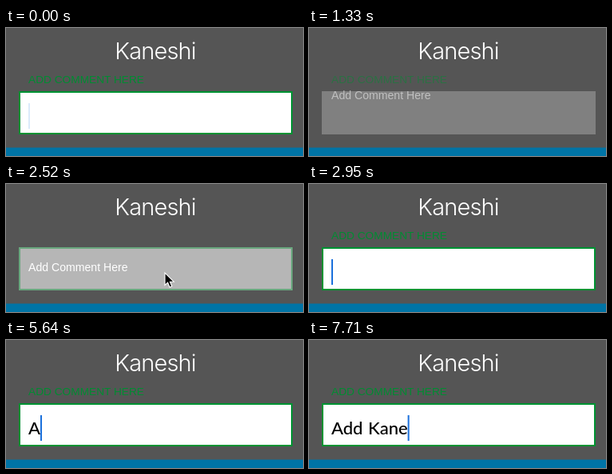
Write an HTML page that moves like this. It is 372 px wide and 160 px high and loops after 8 s.

```html
<!DOCTYPE html>
<html lang="en">
<head>
<meta charset="utf-8">
<title>Floating label field</title>
<style>
  html, body { margin: 0; width: 100%; height: 100%; overflow: hidden; background: #555; }
  svg { display: block; width: 372px; height: 160px; }
  text { white-space: pre; }
  .title { font: 300 29px Inter, sans-serif; letter-spacing: -.03em; fill: #fff; }
  .label { font: 13.7px "Liberation Sans", Arial, sans-serif; fill: #008c32; }
  .hint { font: 14.1px "Liberation Sans", Arial, sans-serif; fill: #fff; }
  .typed { font: 500 22px Lato, sans-serif; word-spacing: 1px; fill: #000; }
</style>
</head>
<body>
<svg viewBox="0 0 372 160">
  <rect width="372" height="160" fill="#555"/>
  <rect y="149.5" width="372" height="11" fill="#0074a6"/>
  <text class="title" x="187" y="39" text-anchor="middle">Kaneshi</text>
  <rect id="field" x="16" y="79" width="343" height="54"/>
  <rect id="border" x="17" y="80" width="341" height="52" fill="none" stroke="#009232" stroke-width="2"/>
  <text id="label" class="label" x="28" y="69">ADD COMMENT HERE</text>
  <text id="hint" class="hint" x="28">Add Comment Here</text>
  <text id="typed" class="typed" x="28" y="118"></text>
  <rect id="caret" y="94" width="2" height="32" fill="#1a70dc"/>
  <path id="cursor" d="M0 0V15.5L3.6 12.2L6 18L8.8 16.8L6.4 11.2H11.2Z" fill="#000" stroke="#fff" stroke-width="1.1"/>
</svg>
<script>
const LOOP = 8000;
const MESSAGE = "Add Kane";
const [field, border, label, hint, typed, caret, cursor] =
  ["field", "border", "label", "hint", "typed", "caret", "cursor"].map(id => document.getElementById(id));

// Time of each key press
const keyTimes = [5640, 5790, 5940, 6390, 6830, 7120, 7410, 7710];

// [start time, caret opacity]
const caretSteps = [
  [0, .15], [150, 1], [450, 0], [900, .15], [1050, 1], [1170, 0],
  [2600, 1], [3250, 0], [3550, .15], [3690, 1], [3990, 0], [4140, .15],
  [4290, 1], [4590, 0], [5040, .15], [5190, 1]
];

const progress = (t, start, end) => Math.min(1, Math.max(0, (t - start) / (end - start)));
const smooth = p => p * p * (3 - 2 * p);
const mix = (a, b, p) => a + (b - a) * p;
const stepAt = (steps, t) => steps.findLast(([start]) => start <= t)[1];

function render(t) {
  const focus = 1 - progress(t, 1130, 1300) + progress(t, 2450, 2617);
  const raised = 1 - smooth(progress(t, 1130, 1530)) + smooth(progress(t, 2550, 2940));

  const shade = mix(128, 255, focus);
  field.setAttribute("fill", `rgb(${shade},${shade},${shade})`);
  border.setAttribute("opacity", focus);
  label.setAttribute("opacity", raised);
  hint.setAttribute("y", mix(109, 69, raised));
  hint.setAttribute("opacity", 1 - raised);

  typed.textContent = MESSAGE.slice(0, keyTimes.filter(time => time <= t).length);
  const width = typed.textContent ? typed.getComputedTextLength() : 0;
  caret.setAttribute("x", 28 + width);
  caret.setAttribute("opacity", stepAt(caretSteps, t));

  const arrival = 1 - (1 - progress(t, 2020, 2420)) ** 2;
  cursor.setAttribute("transform", `translate(${mix(214, 199, arrival)} ${mix(162, 111, arrival)})`);
  cursor.setAttribute("visibility", t >= 2020 && t < 2880 ? "visible" : "hidden");
}

const begin = performance.now();
function tick() {
  render((performance.now() - begin) % LOOP);
  requestAnimationFrame(tick);
}
tick();
</script>
</body>
</html>
```
